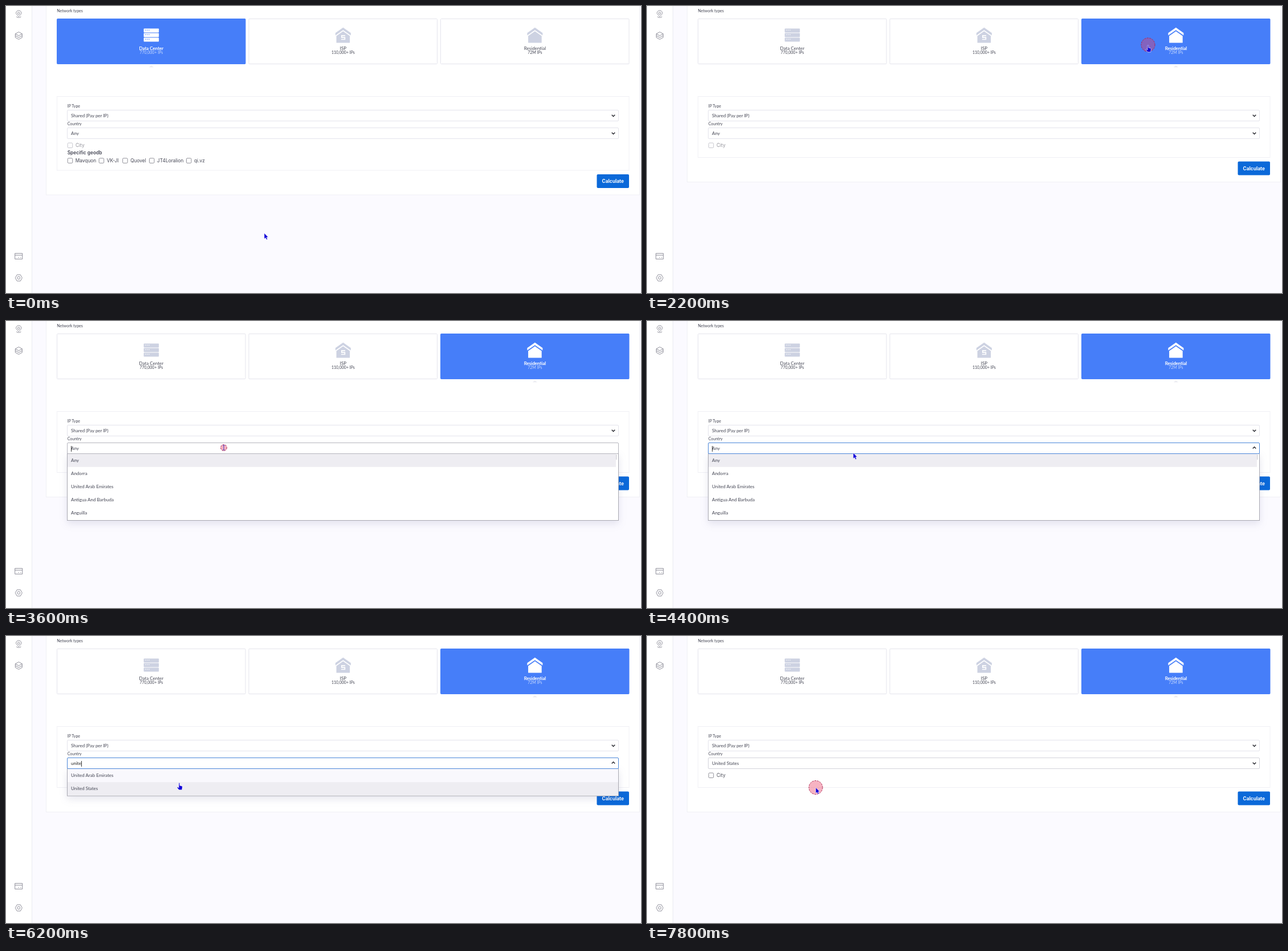
Write an HTML page that moves like this. It is 1114 px wide and 503 px high and loops after 8 s.

```html
<!DOCTYPE html>
<html lang="en">
<head>
<meta charset="utf-8">
<title>Network types</title>
<style>
  html, body { margin: 0; width: 100%; height: 100%; overflow: hidden; background: #fbfaff; }
  svg { display: block; width: 1114px; height: 503px; }
  text { font: 8px Lato, sans-serif; fill: #444654; white-space: pre; }
  .label { font-size: 7px; }
  .ui { font: 8.35px Inter, sans-serif; }
  .bold { font-weight: 600; }
  .mid { text-anchor: middle; }
  .line { fill: none; stroke: #858591; stroke-width: .9; stroke-linejoin: round; }
  .box { fill: #fff; stroke: #e4e4ec; }
  .pale { fill: #fff; stroke: #f0f0f5; }
  .check { fill: #fff; stroke: #75757f; stroke-width: .8; }
  .chevron { fill: none; stroke: #24252c; stroke-width: 1.4; }
  .card .icon { fill: #cdd2e2; }
  .card .gap { fill: #fff; }
  .card .tip { fill: none; }
  .card.hover .box { fill: #f9f8fd; }
  .card.on .box { fill: #467ef9; stroke: #467ef9; }
  .card.on .icon, .card.on text { fill: #fff; }
  .card.on .gap { fill: #467ef9; }
  .card.on .tip { fill: #ededf2; }
  .card.on .name { stroke: #fff; stroke-width: .25; }
  .card.on .label { fill: #c9dafd; }
  #drop { filter: drop-shadow(0 5px 7px rgba(60, 60, 120, .13)); }
</style>
</head>
<body>
<svg viewBox="0 0 1114 503">
  <rect width="45" height="503" fill="#fff"/>
  <path d="M45.5 0V503" stroke="#e9e9f0"/>
  <g class="line">
    <path d="M22.3 18.5C19 15 17.6 14 17.6 12.6a4.7 4.7 0 0 1 9.4 0C27 14 25.6 15 22.3 18.5ZM19 18.3c-3 2.4 9.600 2.400 6.600 0"/>
    <circle cx="22.300" cy="12.800" r="1.900"/>
    <path d="M22.300 45.500l6 3.300v6.400l-6 3.300-6-3.300v-6.400ZM16.300 48.800l6 3.300 6-3.300M16.300 52l6 3.300 6-3.300"/>
    <path d="M15.700 433.500h13v10h-13ZM15.700 436.700h13M21.500 440.700h1.500M25 440.700h1.500"/>
    <path d="M19.300 471h6l3 5.500-3 5.500h-6l-3-5.500Z"/>
    <circle cx="22.300" cy="476.500" r="2.400"/>
  </g>

  <rect id="panel" class="pale" x="70.500" y="-9.500" width="1041" height="340"/>
  <text class="label" x="89.300" y="11.300">Network types</text>
  <g id="cards"></g>

  <rect id="form" class="pale" x="89.500" y="158.500" width="1003.500" height="129"/>
  <text class="label" x="107.700" y="177.500">IP Type</text>
  <rect class="box" x="107.500" y="182.500" width="967" height="19" rx="1.500"/>
  <text x="114" y="195.100">Shared (Pay per IP)</text>
  <path class="chevron" d="M1062.700 190.700l2.800 2.800 2.800-2.800"/>
  <text class="label" x="107.700" y="208.500">Country</text>

  <rect id="cityBox" class="check" x="108.200" y="240" width="8.500" height="8.500" rx="1.500"/>
  <text id="city" class="ui" x="122" y="247.300">City</text>
  <g id="geo"><text class="ui bold" x="107.700" y="260.400">Specific geodb</text></g>

  <g id="button">
    <rect x="1036.500" y="295" width="56.500" height="24" rx="2" fill="#0b69d9"/>
    <text class="ui mid" x="1064.800" y="310.200" style="font-weight:700;fill:#fff">Calculate</text>
  </g>

  <g id="drop">
    <rect id="dropBox" x="107.500" y="232.500" width="967" fill="#fff" stroke="#a9a9b2"/>
    <g id="rows"></g>
    <rect id="thumb" x="1070" y="234" width="1.500" height="9" fill="#d6d6dc"/>
  </g>
  <rect id="country" class="box" x="107.500" y="213.500" width="967" height="19" rx="1.500"/>
  <text id="value" x="114" y="226.100"></text>
  <rect id="caret" y="219" width=".9" height="10" fill="#222"/>
  <path id="arrowMark" class="chevron"/>

  <circle id="ripple" fill="#e8385f" fill-opacity=".38" stroke="#b02a55" stroke-width="1" stroke-dasharray="3 1.500"/>
  <g id="cursor" fill="#1000d8" stroke="#fff" stroke-width=".6" stroke-linejoin="round">
    <path id="arrow" d="M0 0V10.300L2.300 8.300 4 11.600 5.800 10.700 4.200 7.500H7.200Z"/>
    <path id="hand" d="M-.9 1q.9-1.300 1.800 0V5l3.400.9q1.300.4 1.100 1.700L4.700 12.800H-.5L-3.800 8.800q.1-1.500 1.300-1L-.9 9Z"/>
    <path id="beam" d="M-1.700-4H1.700M0-4V4M-1.700 4H1.700" stroke="#4a3fc0" stroke-width="1"/>
  </g>
</svg>
<script>
const LOOP = 8000, STEP = 200;
const $ = id => document.getElementById(id);
const set = (id, attrs) => { for (const k in attrs) $(id).setAttribute(k, attrs[k]); };
const show = (id, on) => { $(id).style.display = on ? '' : 'none'; };

const server = cx => [39.5, 47.5, 55.5].map(y =>
  `<rect class="icon" x="${cx - 13.3}" y="${y}" width="26.600" height="7" rx="1"/>` +
  [0, 3, 6].map(d => `<circle class="gap" cx="${cx - 10 + d}" cy="${y + 2.8}" r=".8"/>`).join('')).join('');
const house = cx => `<path class="icon" d="M${cx} 37.800l13.500 9.500v4.200L${cx} 42.200l-13.500 9.300v-4.200Z
  M${cx} 44.200l11.800 8.200V64.500h-23.600v-12.100Z"/>`;
const five = cx => `<path d="M${cx + 3.7} 51.800h-6.200v3.300h5.500v3.400h-6.500" fill="none" stroke="#fff" stroke-width="1.700"/>`;

$('cards').innerHTML = [
  ['Data Center', '770,000+ IPs', server],
  ['ISP', '110,000+ IPs', cx => house(cx) + five(cx)],
  ['Residential', '72M IPs', house]
].map(([name, count, icon], i) => {
  const x = 89.5 + i * 336.5, cx = x + 165.4;
  return `<g class="card"><rect class="box" x="${x}" y="22.500" width="330.500" height="79" rx="1"/>
    ${icon(cx)}<text class="mid name" x="${cx}" y="76.900">${name}</text>
    <text class="mid label" x="${cx}" y="84">${count}</text>
    <path class="tip" d="M${cx - 4} 107.500l4-3.800 4 3.800Z"/></g>`;
}).join('');
const cards = document.querySelectorAll('.card');

$('geo').innerHTML += [[108, 'Mavquon'], [163, 'VK-JI'], [204.500, 'Quovel'], [251.300, 'JT4Loralion'], [316.300, 'qi.vz']]
  .map(([x, name]) => `<rect class="check" x="${x + .2}" y="266.800" width="8.500" height="8.500" rx="1.500"/>
    <text class="ui" x="${x + 13.7}" y="274.200">${name}</text>`).join('');

const ALL = ['Any', 'Andorra', 'United Arab Emirates', 'Antigua And Barbuda', 'Anguilla'];
const FOUND = ['United Arab Emirates', 'United States'];

// time, x, y of the pointer's hot spot
const PATH = [[600, 453, 398], [1800, 879, 68], [2400, 879, 68], [3500, 382, 222], [4200, 382, 222],
  [4800, 304, 257], [6600, 304, 257], [7400, 296, 265.5]];
const CLICKS = [1960, 3510, 7560];

function pointer(t) {
  const i = PATH.findIndex(p => p[0] > t);
  if (i === 0) return PATH[0].slice(1);
  if (i < 0) return PATH[PATH.length - 1].slice(1);
  const [a, b] = [PATH[i - 1], PATH[i]];
  const u = (t - a[0]) / (b[0] - a[0]), e = u * u * (3 - 2 * u);
  return [a[1] + (b[1] - a[1]) * e, a[2] + (b[2] - a[2]) * e];
}

function drawRows(items, fills, width) {
  $('rows').innerHTML = items.map((name, i) => {
    const y = 233 + i * 23.1;
    return `<rect x="108" y="${y}" width="${width}" height="22.800" fill="${fills[i] || '#fff'}"/>
      <text x="114" y="${y + 13.9}">${name}</text>`;
  }).join('');
  set('dropBox', { height: items.length * 23.1 + 1.5 });
}

function render(t) {
  const residential = t >= 2200, open = t >= 3600 && t < 7800, typing = t >= 5800 && open, done = t >= 7800;

  cards[0].classList.toggle('on', !residential);
  cards[2].classList.toggle('on', residential);
  cards[2].classList.toggle('hover', t >= 2000);
  show('geo', !residential);
  set('panel', { height: residential ? 318 : 340.5 });
  set('form', { height: residential ? 107 : 129.5 });
  set('button', { transform: `translate(0 ${residential ? -22.5 : 0})` });
  $('city').style.fill = done ? '#4b4d58' : '#92929a';
  $('cityBox').style.stroke = done ? '#75757f' : '#b9b9c2';

  const typed = 'unite'.slice(0, t < 6000 ? 2 : t < 6200 ? 3 : 5);
  $('value').textContent = done ? 'United States' : typing ? typed : 'Any';
  $('value').style.fill = typing ? '#222' : '';
  $('country').style.stroke = open ? (t < 3800 ? '#b5b5bd' : '#4a86d8') : done ? '#d3d3da' : '';
  show('caret', open);
  set('caret', { x: typing ? 114.2 + $('value').getComputedTextLength() : 114 });
  show('arrowMark', t !== 3600);
  set('arrowMark', { d: open ? 'M1062.700 223.500l2.800-2.800 2.800 2.800' : 'M1062.700 221.700l2.800 2.800 2.800-2.800' });

  show('drop', open);
  show('thumb', !typing);
  if (typing) drawRows(FOUND, ['#f9f8fd', '#eeedf2'], 966);
  else drawRows(ALL, ['#eeedf2', t >= 4600 ? '#eeedf2' : '#fff'], 962);

  const [x, y] = pointer(t);
  const kind = t >= 3400 && t < 4400 ? 'beam'
    : (t >= 1800 && y < 102) || (open && y > 233) ? 'hand' : 'arrow';
  for (const id of ['arrow', 'hand', 'beam']) show(id, id === kind);
  set('cursor', { transform: `translate(${x} ${y})` });

  const age = t - CLICKS.filter(c => c <= t).pop();
  show('ripple', age < 500);
  if (age < 500) set('ripple', {
    cx: x, cy: y, r: 12 * Math.min(1, age / 200), opacity: Math.min(1, (500 - age) / 200)
  });
}

let last = -1;
function tick(now) {
  const t = Math.floor(now % LOOP / STEP) * STEP;
  if (t !== last) render(last = t);
  requestAnimationFrame(tick);
}
render(0);
requestAnimationFrame(tick);
</script>
</body>
</html>
```
